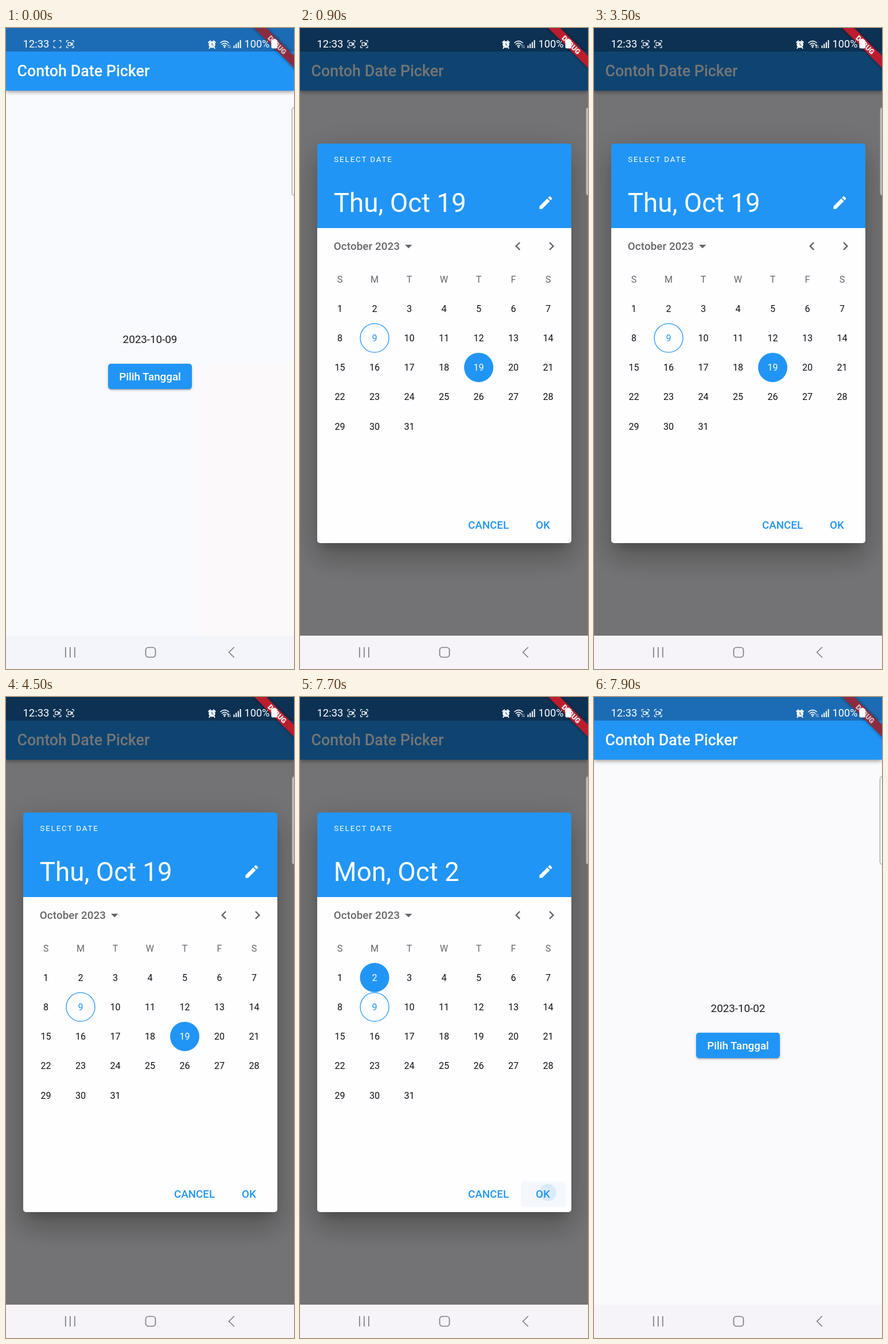
These frames come from a looping animation (502x1115 px, 8000 ms). An HTML page:

```html
<!DOCTYPE html>
<html lang="id">
<head>
<meta charset="utf-8">
<title>Date picker</title>
<style>
  :root { --blue: #2195f5; }
  html, body { margin: 0; width: 502px; height: 1115px; overflow: hidden; }
  body { position: relative; background: #faf9fc; font-family: Roboto, sans-serif; }
  div, svg { position: absolute; }
  svg { left: 0; top: 0; width: 502px; height: 1115px; overflow: visible; }
  .fill { inset: 0; }
  .mid { text-anchor: middle; }
  .med { font-weight: 500; }
  .t14 { font-size: 18.8px; }
  .t12 { font-size: 16.1px; }
  .blue { fill: var(--blue); }
  .grey { fill: #666; }

  .status { left: 0; top: 0; width: 502px; height: 41px; background: #1c6cb5; }
  .appbar {
    left: 0; top: 0; width: 502px; height: 109px; background: var(--blue);
    box-shadow: 0 2px 5px -1px rgba(0,0,0,.22), 0 4px 6px rgba(0,0,0,.14), 0 1px 10px rgba(0,0,0,.12);
  }
  .tint { background: linear-gradient(#fcf9fb, #fcf9fb) 335px 585px / 167px 530px no-repeat #f9fafe; }
  .button {
    left: 178px; top: 584px; width: 146px; height: 44px; border-radius: 5px; background: var(--blue);
    box-shadow: 0 3px 2px -2px rgba(0,0,0,.2), 0 2px 3px rgba(0,0,0,.16), 0 1px 6px rgba(0,0,0,.12);
  }
  .barrier { background: rgba(0,0,0,.54); }
  .card {
    left: 29.5px; top: 201px; width: 443px; height: 695px; border-radius: 5px;
    background: linear-gradient(var(--blue) 147px, #fefdff 147px);
    box-shadow: 0 13px 18px -8px rgba(0,0,0,.2), 0 29px 46px 4px rgba(0,0,0,.14), 0 11px 56px 10px rgba(0,0,0,.12);
  }
  .nav { left: 0; top: 1057px; width: 502px; height: 58px; background: #f6f4f8; }

  .run { animation: 8s step-end infinite; }
  .early { animation-name: early; }
  .open { animation-name: open; }
  .old { animation-name: old; }
  .new { animation-name: new; }
  .before { animation-name: before; }
  .after { animation-name: after; }
  .tap { animation-name: tap; }
  .press { animation-name: press; }
  .ripple { animation-name: ripple; }
  .lit { animation-name: lit; }
  .banner { animation-name: banner; }
  .blink { animation: blink 1s step-end infinite; }

  @keyframes early { 0% { opacity: 1 } 11.25%, 100% { opacity: 0 } }
  @keyframes open { 0% { opacity: 0 } 11.25% { opacity: 1 } 97.5% { opacity: .5 } 98.75%, 100% { opacity: 0 } }
  @keyframes old { 0% { opacity: 1 } 62.5%, 100% { opacity: 0 } }
  @keyframes new { 0% { opacity: 0 } 62.5%, 100% { opacity: 1 } }
  @keyframes before { 0% { opacity: 1 } 97.5%, 100% { opacity: 0 } }
  @keyframes after { 0% { opacity: 0 } 97.5%, 100% { opacity: 1 } }
  @keyframes tap { 0% { opacity: 0 } 61.25% { opacity: .14 } 62.5% { opacity: .1 } 63.75% { opacity: .05 } 65%, 100% { opacity: 0 } }
  @keyframes press { 0% { opacity: 0 } 95% { opacity: .02 } 96.25% { opacity: .04 } 98.75%, 100% { opacity: 0 } }
  @keyframes ripple { 0% { opacity: 0; r: 6px } 95% { opacity: .06; r: 6px } 96.25% { opacity: .12; r: 15px } 97.5% { opacity: .1; r: 21px } 98.75%, 100% { opacity: 0; r: 6px } }
  @keyframes lit { 0% { opacity: .45 } 31.25% { opacity: 1 } 62.5%, 100% { opacity: .45 } }
  @keyframes banner { 0% { fill: #8c2b3e; color: #ddcbd2 } 11.25% { fill: #bd1c2d; color: #fff } 98.75%, 100% { fill: #8c2b3e; color: #ddcbd2 } }
  @keyframes blink { 0% { opacity: 0 } 50%, 100% { opacity: 1 } }
</style>
</head>
<body>
  <div class="fill tint run early"></div>
  <div class="appbar"></div>
  <div class="status"></div>
  <div class="button"></div>
  <svg>
    <text class="med" x="19.5" y="83.5" font-size="26.85" fill="#fff">Contoh Date Picker</text>
    <g class="t14 mid" fill="#1c1c1e">
      <text class="run before" x="251" y="547.5">2023-10-09</text>
      <text class="run after" x="251" y="547.5">2023-10-02</text>
    </g>
    <text class="t14 med mid" x="251" y="612.5" fill="#fff">Pilih Tanggal</text>
  </svg>

  <div class="fill run open">
    <div class="fill barrier"></div>
    <div class="card"></div>
    <svg>
      <g fill="#fff">
        <text x="59.3" y="233" font-size="13.44" letter-spacing="1.83">SELECT DATE</text>
        <g font-size="45.7">
          <text class="run old" x="58.8" y="320">Thu, Oct 19</text>
          <text class="run new" x="58.8" y="320">Mon, Oct 2</text>
        </g>
        <path transform="translate(413.8 289) scale(1.222)" d="M3 17.25V21h3.75L17.81 9.94l-3.75-3.75zM20.71 7.04c.39-.39.39-1.02 0-1.41l-2.34-2.34c-.39-.39-1.02-.39-1.41 0l-1.83 1.83 3.75 3.75z"/>
      </g>
      <g class="grey">
        <text class="t14 med" x="58.8" y="385.7" letter-spacing=".1">October 2023</text>
        <path d="M183 377h12.4l-6.2 6.2z"/>
        <path transform="translate(365.2 364.8) scale(1.222)" d="M15.41 7.41L14 6l-6 6 6 6 1.41-1.41L10.83 12z"/>
        <path transform="translate(423.6 364.8) scale(1.222)" d="M10 6L8.59 7.41 13.17 12l-4.58 4.58L10 18l6-6z"/>
      </g>
      <g id="grid" class="t12 mid"></g>
      <rect class="blue run press" x="385" y="843" width="78.5" height="44" rx="5"/>
      <circle class="blue run ripple" cx="432" cy="862" r="6"/>
      <g class="t14 med mid blue">
        <text x="328.5" y="870.5">CANCEL</text>
        <text x="423.5" y="870.5">OK</text>
      </g>
    </svg>
  </div>

  <svg>
    <g class="run banner" transform="translate(502 0) rotate(45)">
      <rect x="-60" y="34.2" width="120" height="14.7" style="filter: drop-shadow(0 0 3px rgba(0,0,0,.5))"/>
      <text class="mid" y="46" font-size="12.5" font-weight="900" style="fill: currentColor">DEBUG</text>
    </g>
  </svg>

  <div class="nav"></div>
  <div class="nav run early" style="background:#f4f5fa"></div>
  <svg>
    <defs>
      <path id="corners" d="M.7 4V1.7q0-1 1-1H4M10 .7h2.3q1 0 1 1V4M13.3 10v2.3q0 1-1 1H10M4 13.3H1.7q-1 0-1-1V10"/>
      <path id="camera" d="M3.4 4.4h5v5.2h-5zM8.6 6.6l2.6-1.6v4l-2.6-1.6"/>
    </defs>
    <g fill="#fff">
      <text x="29.5" y="34.2" font-size="18.4">12:33</text>
      <text x="415.5" y="34.2" font-size="18.2">100%</text>
      <rect x="465.5" y="19" width="5" height="3" rx="1"/>
      <rect x="462.5" y="20.5" width="10.5" height="15" rx="2"/>
      <circle cx="359" cy="28.8" r="5.8"/>
      <circle cx="381" cy="33" r="1.5"/>
      <path d="M396.5 30.5h2V35h-2zM400.2 27.5h2V35h-2zM403.9 24.5h2V35h-2zM407.6 21h2V35h-2z"/>
    </g>
    <g fill="none" stroke="#fff" stroke-width="1.2">
      <use href="#corners" x="82.5" y="21"/>
      <use class="blink" href="#camera" x="82.5" y="21"/>
      <use href="#corners" x="104.8" y="21"/>
      <use href="#camera" x="104.8" y="21"/>
      <path stroke-width="2" stroke-linecap="round" d="M353.2 25l3-2.6M364.8 25l-3-2.6M355.5 33.5l-1.2 1.6M362.5 33.5l1.2 1.6"/>
      <path stroke="#1c6cb5" d="M359 25.5v3.6l2.6 1.5"/>
      <path stroke-width="1.5" d="M373.4 26q7.6-6.8 15.2 0M375.8 28.7q5.2-4.6 10.4 0M378.2 31.2q2.8-2.4 5.6 0"/>
      <path class="run lit" d="M387.3 35v-5.5M385.9 31l1.4-1.7 1.4 1.7"/>
      <path opacity=".45" d="M390.3 29v5.5M388.9 33l1.4 1.7 1.4-1.7"/>
    </g>
    <path d="M503 138.5h-1.5q-3 0-3 4v144.5q0 4 3 4h1.5" fill="rgba(255,255,255,.55)" stroke="#8a8a8c"/>
    <g fill="none" stroke="#7d7e83" stroke-width="1.7">
      <path d="M103.8 1077v18M111.8 1077v18M119.8 1077v18"/>
      <rect x="243.5" y="1077.5" width="17" height="17" rx="4.8"/>
      <path d="M397.8 1077l-9.2 9 9.2 9"/>
    </g>
  </svg>

<script>
  const NS = 'http://www.w3.org/2000/svg';
  const grid = document.getElementById('grid');
  const colX = c => 69.5 + 60.5 * c;
  const rowY = r => 436.8 + 51.2 * r;

  function add(parent, tag, attrs, text = '') {
    const el = document.createElementNS(NS, tag);
    for (const key in attrs) el.setAttribute(key, attrs[key]);
    el.textContent = text;
    return parent.appendChild(el);
  }

  // October 2023 starts on a Sunday.
  const place = day => [colX((day - 1) % 7), rowY(1 + Math.floor((day - 1) / 7))];

  function label(parent, [x, y], text, fill) {
    add(parent, 'text', { x, y: y + 5.7, fill }, text);
  }

  function disc(parent, [cx, cy], attrs) {
    add(parent, 'circle', { cx, cy, r: 25.5, ...attrs });
  }

  function select(day, cls) {
    const g = add(grid, 'g', { class: 'run ' + cls });
    disc(g, place(day), { class: 'blue' });
    label(g, place(day), day, '#fff');
  }

  [...'SMTWTFS'].forEach((name, c) => label(grid, [colX(c), rowY(0)], name, '#666'));
  const today = 9;
  for (let day = 1; day <= 31; day++) {
    label(grid, place(day), day, day === today ? '#2195f5' : '#111');
  }
  disc(grid, place(today), { r: 25, fill: 'none', stroke: '#2195f5', 'stroke-width': 1.3 });
  select(19, 'old');
  select(2, 'new');
  disc(grid, place(2), { class: 'blue run tap', r: 28 });
</script>
</body>
</html>
```
